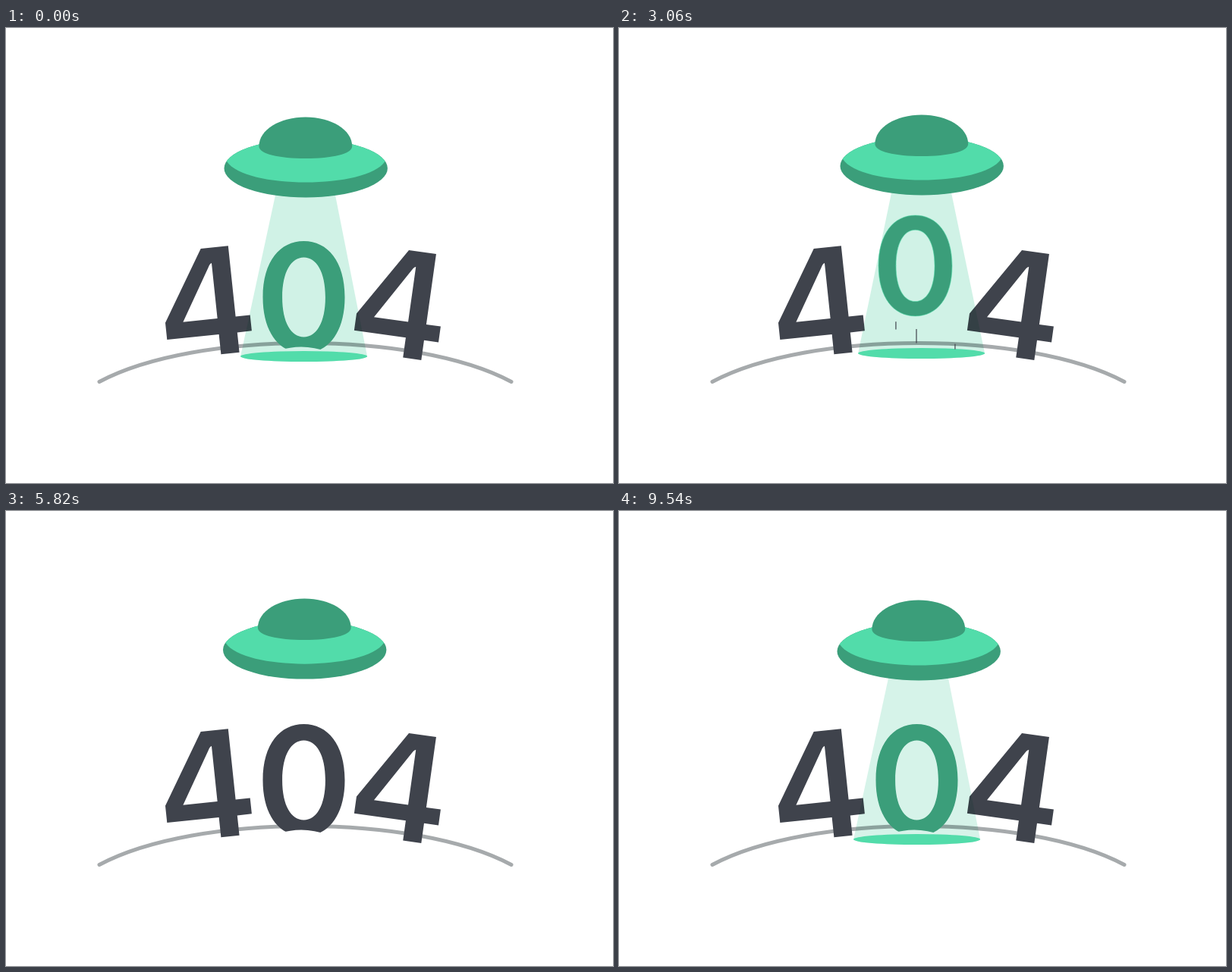
Recreate the animation shown at these times as an HTML page with a canvas. Size 800 by 600 pixels, loop 9.6 s.

```html
<!DOCTYPE html>
<html lang="en">
<head>
<meta charset="utf-8">
<title>404</title>
<style>
  html, body { margin: 0; width: 100%; height: 100%; overflow: hidden; background: #fff; }
  canvas { display: block; }
</style>
</head>
<body>
<canvas id="stage" width="800" height="600"></canvas>
<script>
const ctx = document.getElementById('stage').getContext('2d');

const LOOP = 9600, STEP = 60;
const LIGHT_OFF = 4080, LIGHT_ON = 9140;
const DROP = 4340, LAND = 4620;
const INK = [63, 67, 76], GREEN = [59, 158, 122], MINT = '#52dcaa';

const rgb = c => `rgb(${c.map(Math.round)})`;
const clamp = v => Math.min(1, Math.max(0, v));
const mix = (a, b, u) => a + (b - a) * u;
const random = n => Math.abs(Math.sin(n * 12.9898) * 43758.5453) % 1;

const FOUR = new Path2D(
  'M0 0H36.3V93.8H55.5V114.8H36.3V141.3H12V114.8H-56.7V92.4Z' +
  'M12.2 20.5Q10 20.8 7.6 25.2L-33.3 93.8H12.2Z');

// Resting points of the hovering saucer
const hover = [
  { t: 0, x: 0, y: 0 },
  { t: 1740, x: 1, y: -1 },
  { t: 3060, x: 4, y: -3 },
  { t: 4620, x: -4.3, y: -1.5 },
  { t: 7080, x: 1.5, y: -2.3 },
  { t: 8640, x: 0, y: 0 },
  { t: LOOP, x: 0, y: 0 }
];

function hoverAt(t) {
  const i = hover.findIndex(p => p.t > t);
  const a = hover[i - 1], b = hover[i];
  const u = (1 - Math.cos(Math.PI * (t - a.t) / (b.t - a.t))) / 2;
  return [mix(a.x, b.x, u), mix(a.y, b.y, u)];
}

// 0 on the ground, 1 fully lifted
function liftAt(t) {
  if (t < DROP) return 1 - (1 - clamp(t / 4100)) ** 2;
  return 1 - clamp((t - DROP) / (LAND - DROP)) ** 2;
}

function fill(path, color) {
  ctx.fillStyle = color;
  ctx.fill(new Path2D(path));
}

function ellipse(x, y, rx, ry, color) {
  ctx.fillStyle = color;
  ctx.beginPath();
  ctx.ellipse(x, y, rx, ry, 0, 0, Math.PI * 2);
  ctx.fill();
}

function drawGround() {
  ctx.strokeStyle = '#a6aaac';
  ctx.lineWidth = 5;
  ctx.lineCap = 'round';
  ctx.stroke(new Path2D('M123 466.5C250 398.5 539 398.5 666 466.5'));
}

function drawFour(x, y, degrees) {
  ctx.save();
  ctx.translate(x, y);
  ctx.rotate(degrees * Math.PI / 180);
  ctx.fillStyle = rgb(INK);
  ctx.fill(FOUR, 'evenodd');
  ctx.restore();
}

function drawBeam(dx, dy, power, lit) {
  const x = 392.6 + dx * 1.5, y = 433 + dy * 1.33, rx = 83.5, ry = 7;
  ctx.save();
  ctx.globalCompositeOperation = 'multiply';
  ctx.globalAlpha = power;
  ctx.fillStyle = '#d0f2e6';
  ctx.beginPath();
  ctx.moveTo(356.2 + dx, 215 + dy);
  ctx.lineTo(432.9 + dx, 215 + dy);
  ctx.lineTo(x + rx, y);
  ctx.ellipse(x, y, rx, ry, 0, 0, Math.PI);
  ctx.fill();
  ctx.globalCompositeOperation = 'source-over';
  ctx.globalAlpha = lit;
  ellipse(x, y, rx, ry, MINT);
  ctx.restore();
}

function addOval(rx, ry) {
  const kx = rx * .58, ky = ry * .64;
  ctx.moveTo(-rx, 0);
  ctx.bezierCurveTo(-rx, -ky, -kx, -ry, 0, -ry);
  ctx.bezierCurveTo(kx, -ry, rx, -ky, rx, 0);
  ctx.bezierCurveTo(rx, ky, kx, ry, 0, ry);
  ctx.bezierCurveTo(-kx, ry, -rx, ky, -rx, 0);
}

function drawZero(lift, color, glow, alpha = 1) {
  const scale = 1 - .109 * lift;
  ctx.save();
  // The foot is hidden behind the ground
  ctx.clip(new Path2D('M0 0H800V427H424Q392 415 360 425H0Z'));
  ctx.translate(392.5 - 2.6 * lift ** 4, 355 - 44.4 * lift);
  ctx.scale(scale, scale);
  ctx.beginPath();
  addOval(54, 74);
  addOval(28.4, 52.5);
  ctx.globalAlpha = alpha;
  ctx.fillStyle = color;
  ctx.fill('evenodd');
  ctx.globalAlpha = glow;
  ctx.strokeStyle = MINT;
  ctx.lineWidth = 1;
  ctx.stroke();
  ctx.restore();
}

function drawFallingZero(t, color) {
  const echoes = 8;
  for (let i = echoes - 1; i >= 0; i--) {
    drawZero(liftAt(t - STEP * i / (echoes - 1)), color, 0, .3);
  }
}

function drawStreaks(t) {
  const life = 600;
  ctx.fillStyle = rgb(INK);
  for (let i = 0; i < 18; i++) {
    const p = (t - 180 - i * 185) / life;
    if (p <= 0 || p >= 1) continue;
    const x = mix(345, 450, random(i + 1));
    const length = mix(12, 23, random(i + 40)) * Math.sin(Math.PI * p);
    ctx.fillRect(x, 428 - 45 * p - length / 2, 1.2, length);
  }
}

function drawScrap(t) {
  const age = t - LIGHT_OFF;
  if (age < 0 || age > 1080) return;
  ctx.save();
  ctx.translate(403.5, 221 + .00026 * age * age);
  fill('M-8 -2Q-7 -6 -1 -5L7.5 -4Q7 2 4 5.5Q0 5 -3 2Q-6 2 -8 -2Z', rgb(INK));
  ctx.restore();
}

function drawSaucer(dx, dy) {
  ctx.save();
  ctx.translate(dx, dy);
  ellipse(395.2, 185, 107.7, 38.5, rgb(GREEN));
  ctx.save();
  ctx.clip();
  fill('M270 130H520V176H499.5C475 212.7 315 212.7 291 176H270Z', MINT);
  ctx.restore();
  fill('M333.4 156C333.4 134 361 117.5 394.8 117.5S456.2 134 456.2 156'
    + 'C456.2 166 430 172 394.8 172S333.4 166 333.4 156Z', rgb(GREEN));
  ctx.restore();
}

function render(t) {
  const [dx, dy] = hoverAt(t);
  const lifting = t < LIGHT_OFF;
  const power = lifting ? 1 : clamp((t - LIGHT_ON) / (LOOP - LIGHT_ON));
  const lit = lifting ? 1 : clamp((t - LIGHT_ON) / 240);
  const lift = liftAt(t);
  const color = rgb(INK.map((v, i) => mix(v, GREEN[i], lit)));

  ctx.fillStyle = '#fff';
  ctx.fillRect(0, 0, 800, 600);
  drawGround();
  drawFour(256.7, 291, -6);
  drawFour(531, 293, 8);
  drawBeam(dx, dy, power, lit);
  if (t > DROP && t <= LAND) drawFallingZero(t, color);
  else drawZero(lift, color, lifting ? lift * .7 : 0);
  if (lifting) drawStreaks(t);
  drawScrap(t);
  drawSaucer(dx, dy);
}

const start = performance.now();
function tick() {
  const t = (performance.now() - start) % LOOP;
  render(Math.floor(t / STEP) * STEP);
  requestAnimationFrame(tick);
}
tick();
</script>
</body>
</html>
```
